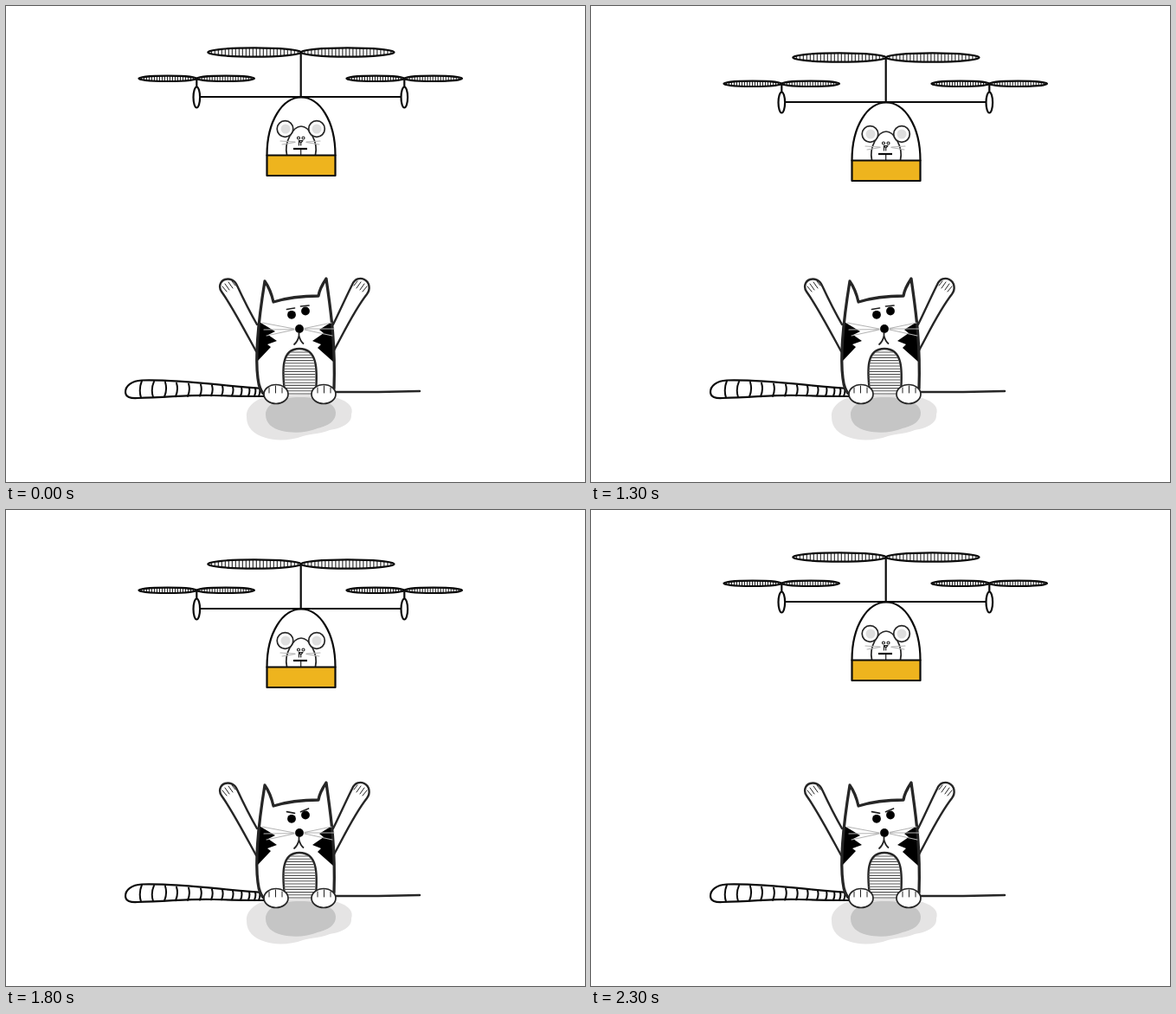
An HTML page for the animation above (3.3 s loop, 669 px wide and 550 px high).

```html
<!DOCTYPE html>
<html lang="en">
<head>
<meta charset="utf-8">
<title>Cat and flying mouse</title>
<style>
html, body { margin: 0; width: 100%; height: 100%; overflow: hidden; background: #fff; }
svg { display: block; width: 669px; height: 550px; }
.ink { stroke: #0b0b0b; stroke-width: 2.2; fill: none; }
.soft { stroke: #262626; stroke-width: 2.4; fill: #fff; }
.thin { stroke: #222; stroke-width: 1; fill: none; }
.hair { stroke: #b4b4b4; stroke-width: 1.1; fill: none; }
.white { fill: #fff; }
.brow { stroke: #222; stroke-width: 1.7; }
</style>
</head>
<body>
<svg viewBox="0 0 669 550" stroke-linecap="round" stroke-linejoin="round">
  <g id="shadow">
    <path fill="#e5e4e4" d="M278 475 C277 462 290 453 306 450 C330 446 365 447 383 453 C396 457 402 464 399 472 C400 482 388 488 374 490 C366 494 353 494 343 497 C330 502 312 503 300 499 C286 495 278 487 278 475Z"/>
    <path fill="#c5c5c5" d="M300 472 C300 460 316 452 340 452 C364 452 381 459 381 470 C381 482 368 486 360 488 C348 493 332 494 319 491 C307 488 300 482 300 472Z"/>
  </g>

  <g id="tail">
    <path class="ink white" d="M297 442 C250 439 200 431 157 432.5 C145 433 138 439 138 446 C138 452 144 453.5 152 453 C190 452 215 449 240 450 C262 450.5 280 451 298 451"/>
    <path id="rings" class="ink" style="stroke-width:2"/>
    <path class="soft" style="fill:none" d="M381 446 L430 446 L478 445"/>
  </g>

  <g id="arms" class="soft">
    <path d="M290 368 C282 354 274 338 267 323 C264 316 258 314.500 253 316 C247 318 245.500 325 249 330 C262 348 278 379 289 399"/>
    <path d="M378 368 C385 354 392 338 400 322 C403 315 409 313.500 414 316 C420 319 421.500 327 417 333 C402 352 390 378 379 398"/>
    <path class="thin" d="M250 324L255 330M253 321L258 328M257 319L262 326M261 318L265 323M417 324L412 330M414 321L409 328M410 319L405 326M406 318L402 323"/>
  </g>

  <g id="body">
    <path fill="#fff" d="M299 318 L309 342 Q335 335 361 335 L370 315 C374 345 380 385 379 448 L300 450 C286 435 290 365 299 318Z"/>
    <path d="M291 364 L311 376 L303 380 L313 387 L302 391 L306 394 L290 411Z M378 364 L362 374 L367 378 L354 387 L364 391 L360 395 L378 411Z"/>
    <path class="soft" style="fill:none;stroke-width:3.300" d="M300 450 C295 447 292 440 291 430 C287 400 293 355 299 318 C304 325 307 333 309 342 C325 337 345 335 361 335 C362 328 366 321 370 315 C374 345 381 385 379 442"/>
    <path class="soft" d="M322 446 C319 420 318 396 339 396 C360 396 360 420 358 446"/>
    <path id="belly" stroke="#555" stroke-width="1.1"/>
  </g>

  <g id="face">
    <path class="hair" d="M333 373L296 366M333 373.500L298 374M333 374L301 381M345 372.500L376 366M345 373L379 373M345 374L377 381"/>
    <circle cx="330" cy="356.800" r="4.900"/>
    <circle cx="346" cy="352.500" r="4.900"/>
    <circle cx="339" cy="373" r="4.900"/>
    <path class="soft" style="fill:none;stroke-width:1.800" d="M338.500 378 V381 Q337.500 387 333 391 M338.500 381 Q340 387 343.500 390"/>
    <g id="calm" class="brow"><path d="M324.500 350.500L333.500 349M340.500 347L350 346"/></g>
    <g id="cross" class="brow"><path d="M324.500 348.700L333.500 350.300M340.500 348.700L349.500 345"/></g>
  </g>

  <g id="feet">
    <ellipse class="soft" style="stroke-width:1.700" cx="312" cy="448.500" rx="14" ry="11"/>
    <ellipse class="soft" style="stroke-width:1.700" cx="367" cy="448.500" rx="14" ry="11"/>
    <path class="thin" d="M304 441V447M311.500 439V447M319 441V447M360 441V447M367.500 439V447M375 441V447"/>
  </g>

  <g id="copter">
    <path id="blades" stroke="#111" stroke-width="1"/>
    <g id="rotors" class="ink"></g>
    <path class="ink" d="M340.700 53.500V105M224 105H457M220.300 84V94M460.300 84V94"/>
    <ellipse class="ink white" cx="220.300" cy="105.500" rx="3.800" ry="12"/>
    <ellipse class="ink white" cx="460.300" cy="105.500" rx="3.800" ry="12"/>
    <path class="ink white" d="M301.500 172.500 C301.500 132 320 105.500 341 105.500 C362 105.500 380.500 132 380.500 172.500"/>
    <g id="mouse">
      <path class="soft" style="stroke-width:1.700" d="M324.500 172 C321 157 332 139 341 139 C350 139 361 157 357.500 172"/>
      <circle class="soft" style="stroke-width:1.700" cx="322.500" cy="142" r="9.300"/>
      <circle class="soft" style="stroke-width:1.700" cx="359" cy="142" r="9.300"/>
      <circle fill="#dedede" cx="323" cy="142" r="5.500"/>
      <circle fill="#dedede" cx="359" cy="142" r="5.500"/>
      <path class="hair" d="M334 157L317 156M334 157.500L319 160M347 157L363 156M347 157.500L362 160"/>
      <g class="thin" style="stroke-width:1.200">
        <circle cx="338" cy="152.500" r="1.500"/>
        <circle cx="343.500" cy="152.500" r="1.500"/>
        <path d="M338.500 155.500H343L340.700 158ZV161M340.700 158V161M340.700 166V172"/>
      </g>
      <path class="ink" stroke-linecap="butt" d="M332 165H348"/>
    </g>
    <rect class="ink" style="fill:#eeb41e" x="301.500" y="172.500" width="79" height="23.500"/>
  </g>
</svg>
<script>
const $ = id => document.getElementById(id);
const LOOP = 3300;

// Height of the dip in pixels, each value held from its start time
const dips = [
  [0, 0], [1000, 1], [1100, 2], [1200, 3], [1300, 6], [1400, 8], [1500, 9], [1600, 10],
  [1800, 9], [1900, 8], [2000, 6], [2100, 3], [2200, 2], [2300, 1]
];
const ANGRY_FROM = 1800;

// One blade: an ellipse filled with upright lines
function blade(cx, cy, rx, ry, gap) {
  const e = document.createElementNS('http://www.w3.org/2000/svg', 'ellipse');
  const size = { cx, cy, rx, ry };
  for (const key in size) e.setAttribute(key, size[key]);
  $('rotors').append(e);
  let d = '';
  for (let x = gap - rx; x < rx; x += gap) {
    const h = ry * Math.sqrt(1 - (x / rx) ** 2);
    d += `M${cx + x} ${cy - h}V${cy + h}`;
  }
  return d;
}

function rotor(x, y, rx, ry, gap) {
  return blade(x - rx, y, rx, ry, gap) + blade(x + rx, y, rx, ry, gap);
}

$('blades').setAttribute('d',
  rotor(340.9, 53.5, 53.8, 5.2, 4) + rotor(220.2, 83.8, 33.4, 3.2, 3) + rotor(460.2, 83.8, 33.4, 3.2, 3));

const rings = [157, 171, 184, 197, 211, 225, 238, 250, 262, 272, 281, 288, 293];
$('rings').setAttribute('d', rings.map((x, i) => {
  const k = (x - 157) / 136;
  const top = 433 + 9 * k, bottom = 452.5 - 3 * Math.sin(k * Math.PI / 1.6) + k;
  const bend = i < 2 ? -4 : 3 - 2 * k;
  return `M${x} ${top}Q${x + bend} ${(top + bottom) / 2} ${x - 1} ${bottom}`;
}).join(''));

let hatch = '';
for (let y = 400; y < 450; y += 3.2) {
  const half = y < 422 ? 18 * Math.sqrt(1 - ((422 - y) / 26) ** 2) : 18 - Math.max(0, y - 438) * 0.35;
  hatch += `M${339 - half} ${y}H${339 + half}`;
}
$('belly').setAttribute('d', hatch);

function draw(now) {
  const t = now % LOOP;
  const dip = dips.filter(step => step[0] <= t).pop()[1];
  const angry = t >= ANGRY_FROM;
  $('copter').setAttribute('transform', `translate(0 ${dip})`);
  $('calm').setAttribute('visibility', angry ? 'hidden' : 'visible');
  $('cross').setAttribute('visibility', angry ? 'visible' : 'hidden');
}

const start = performance.now();
function tick() {
  draw(performance.now() - start);
  requestAnimationFrame(tick);
}
tick();
</script>
</body>
</html>
```
